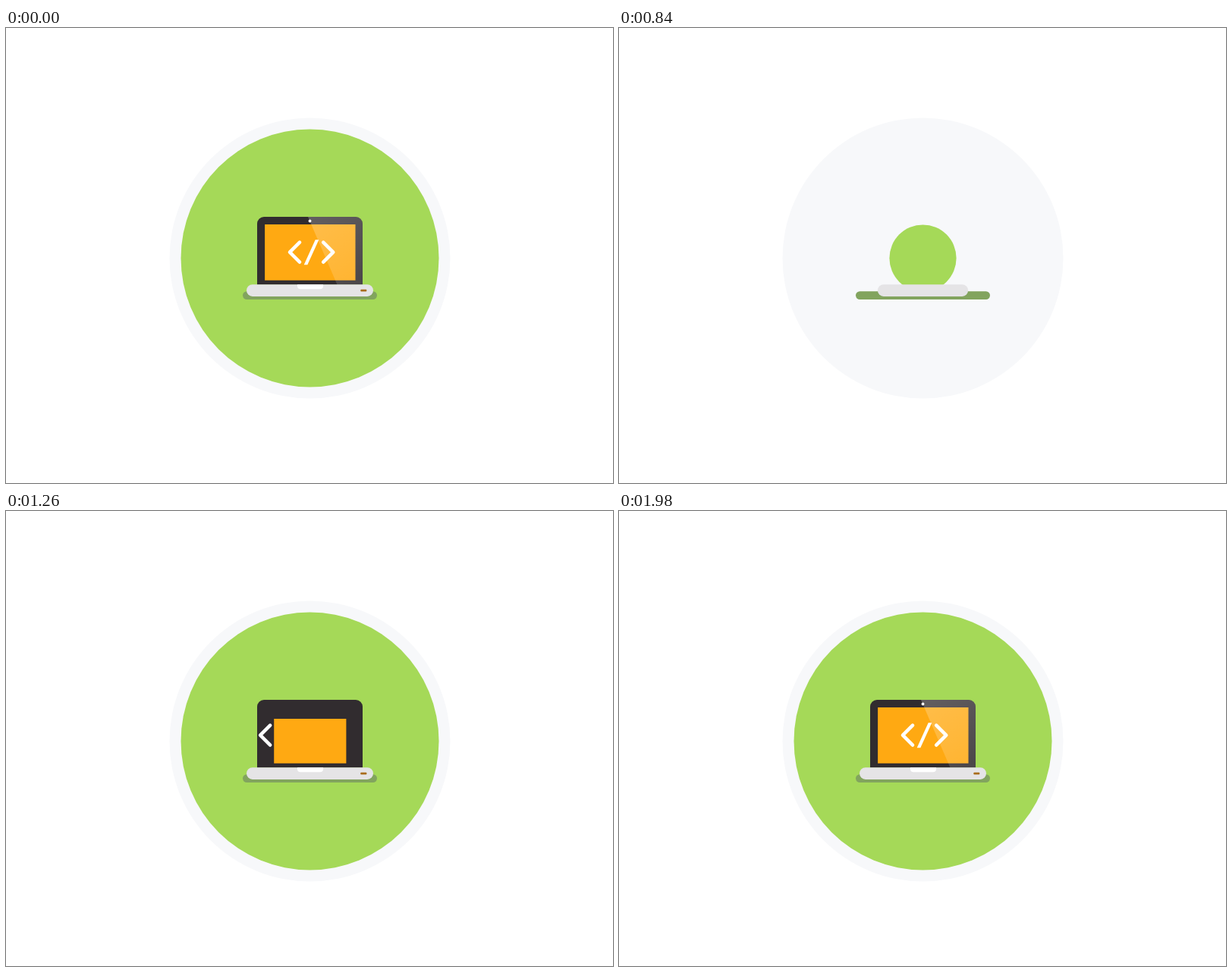
These frames come from a looping animation (800x600 px, 4.13 s). An HTML page with a canvas:

```html
<!DOCTYPE html>
<html lang="en">
<head>
<meta charset="utf-8">
<title>Laptop</title>
<style>
html, body { margin: 0; width: 100%; height: 100%; overflow: hidden; background: #fff; }
canvas { display: block; }
</style>
</head>
<body>
<canvas id="stage" width="800" height="600"></canvas>
<script>
const ctx = document.getElementById('stage').getContext('2d');
const LOOP = 4130, STEP = 30, END = 1980;
const CX = 400.5, CY = 303.5;

const clamp = x => Math.max(0, Math.min(1, x));
const ease = x => x * x * (3 - 2 * x);
const ramp = (t, start, dur) => ease(clamp((t - start) / dur));

// Grows past full size, then settles back.
function pop(t, start, dur = 240, over = 0.045) {
  const grow = ramp(t, start, dur);
  const settle = ramp(t, start + dur, 90);
  return grow * (1 + over) - settle * over;
}

function circle(x, y, r, color) {
  ctx.fillStyle = color;
  ctx.beginPath();
  ctx.arc(x, y, r, 0, Math.PI * 2);
  ctx.fill();
}

function box(x, y, w, h, r, color) {
  ctx.fillStyle = color;
  ctx.beginPath();
  ctx.roundRect(x, y, w, h, r);
  ctx.fill();
}

function poly(points, color) {
  ctx.fillStyle = color;
  ctx.beginPath();
  points.forEach(p => ctx.lineTo(...p));
  ctx.closePath();
  ctx.fill();
}

// Draws around a pivot with the given scale.
function scaled(x, y, sx, sy, draw) {
  if (sx <= 0 || sy <= 0) return;
  ctx.save();
  ctx.translate(x, y);
  ctx.scale(sx, sy);
  draw();
  ctx.restore();
}

// A bar that widens from the middle and keeps round ends.
function bar(y, w, h, color) {
  if (w > 0) box(CX - w / 2, y, w, h, Math.min(w, h) / 2, color);
}

function chevron(x, dir) {
  ctx.strokeStyle = '#fff';
  ctx.lineWidth = 4.6;
  ctx.lineCap = 'round';
  ctx.lineJoin = 'round';
  ctx.beginPath();
  ctx.moveTo(x + dir * 13, 282.7);
  ctx.lineTo(x, 295.7);
  ctx.lineTo(x + dir * 13, 308.7);
  ctx.stroke();
}

function drawLid(t) {
  const lid = pop(t, 836);
  scaled(CX, 338.5, lid, lid, () =>
    box(-69.5, -89.5, 139, 89.5, [9, 9, 0, 0], '#312c2f'));

  const screen = pop(t, 1096);
  scaled(CX + 0.3, 332.7, screen, screen, () =>
    box(-59.7, -73.7, 119.4, 73.7, 0, '#ffa912'));

  const cam = pop(t, 1410, 150, 0);
  if (cam > 0) circle(400.5, 254.5, 1.9 * cam, '#fff');
}

function drawCode(t) {
  if (t >= 1200) chevron(374 - 60 * (1 - ramp(t, 1200, 150)), 1);
  if (t >= 1290) chevron(431.2 + 60 * (1 - ramp(t, 1290, 150)), -1);
  const slash = pop(t, 1350, 120);
  scaled(402.5, 295.7, slash, slash, () =>
    poly([[-9.8, 16.5], [-5.2, 16.5], [9.8, -16.5], [5.2, -16.5]], '#fff'));
}

function drawShine(t) {
  const shine = clamp((t - 1620) / 360);
  if (!shine) return;
  ctx.save();
  ctx.beginPath();
  ctx.roundRect(331, 249, 139, 89.5, [9, 9, 0, 0]);
  ctx.clip();
  ctx.globalAlpha = shine;
  const fill = ctx.createLinearGradient(400, 249, 460, 338);
  fill.addColorStop(0, 'rgba(255,255,255,0.24)');
  fill.addColorStop(1, 'rgba(255,255,255,0.13)');
  poly([[398, 249], [470, 249], [470, 338.5], [436.5, 338.5]], fill);
  ctx.restore();
}

function drawBase(t) {
  bar(338.3, 167 * pop(t, 690), 15.6, '#e5e4e6');
  const notch = pop(t, 1060, 120);
  scaled(401, 338.3, notch, notch, () =>
    box(-17, 0, 34, 6, [0, 0, 4, 4], '#fff'));
  const led = pop(t, 1100, 120);
  scaled(471.3, 346.1, led, led, () =>
    box(-4, -1.3, 8, 2.6, 1, '#a96c1b'));
}

function draw(t) {
  ctx.fillStyle = '#fff';
  ctx.fillRect(0, 0, 800, 600);
  circle(CX, CY, 185 * pop(t, 30), '#f7f8fa');
  circle(CX, CY, 170 * pop(t, 762), '#a5d958');
  bar(347.2, 177 * pop(t, 360, 225), 10.8, '#82a45e');
  drawLid(t);
  drawCode(t);
  drawShine(t);
  drawBase(t);
}

const origin = performance.now();
function tick() {
  const now = (performance.now() - origin) % LOOP;
  const t = Math.floor(now / STEP) * STEP;
  // The loop opens for one step on the finished picture.
  draw(t < STEP ? END : Math.min(t, END));
  requestAnimationFrame(tick);
}
tick();
</script>
</body>
</html>
```
